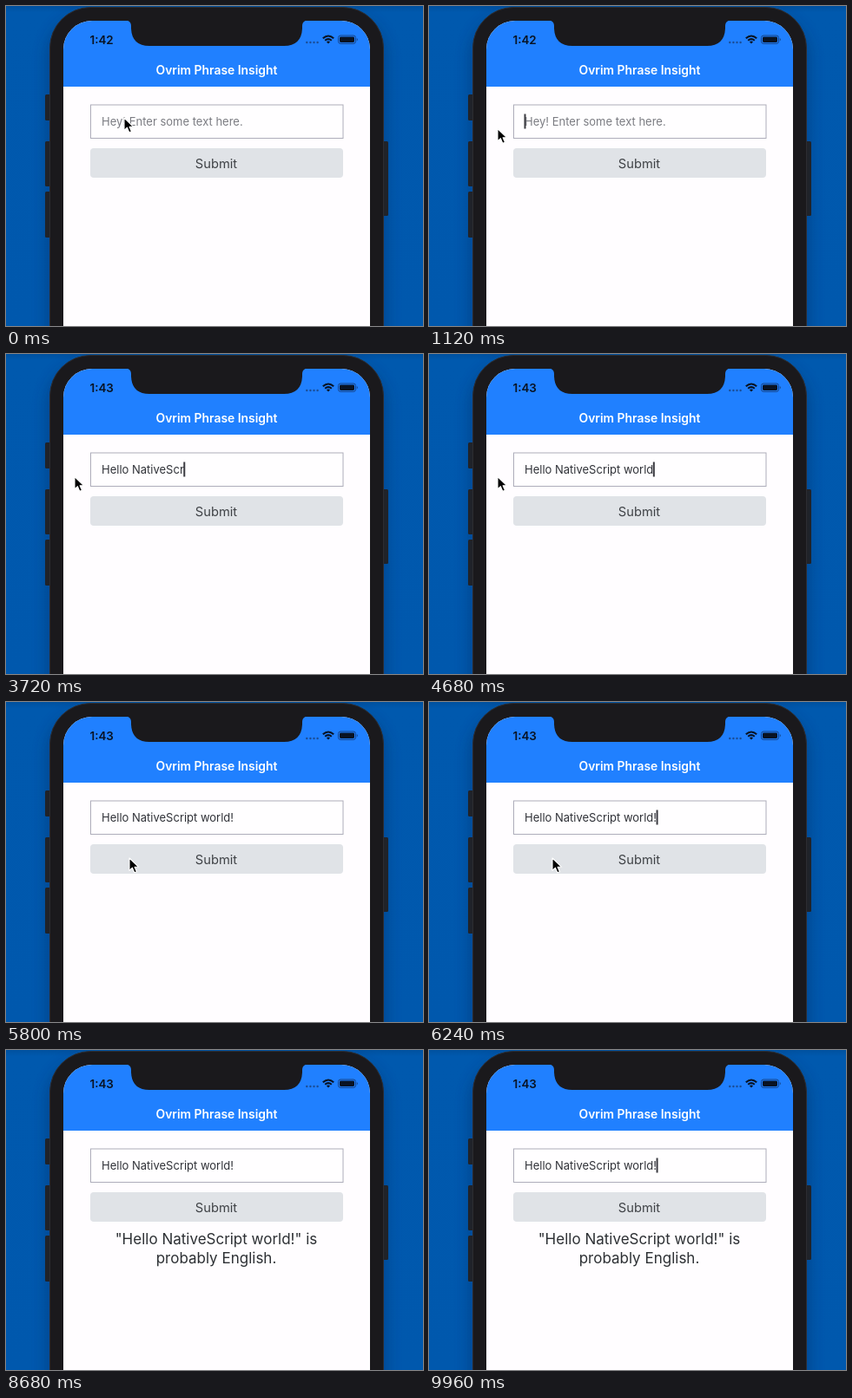
Write an HTML page that moves like this. It is 480 px wide and 369 px high and loops after 10 s.

```html
<!DOCTYPE html>
<html lang="en">
<head>
<meta charset="utf-8">
<title>Text analysis demo</title>
<style>
  html, body { margin: 0; width: 100%; height: 100%; overflow: hidden; background: #0059ae; }
  svg { display: block; width: 100vw; height: 100vh; }
  text { font-family: Inter, "Open Sans", sans-serif; white-space: pre; }
  .mid { text-anchor: middle; }
  .bold { font-weight: 600; }
</style>
</head>
<body>
<svg viewBox="0 0 480 369">
  <defs>
    <linearGradient id="wall" x2="0" y2="1">
      <stop offset="0" stop-color="#00519f"/>
      <stop offset=".02" stop-color="#0059ae"/>
      <stop offset="1" stop-color="#0058ad"/>
    </linearGradient>
    <filter id="soft" x="-20%" y="-20%" width="140%" height="140%">
      <feGaussianBlur stdDeviation="9"/>
    </filter>
    <clipPath id="screen"><rect x="66" y="17" width="353" height="420" rx="33"/></clipPath>
  </defs>

  <rect width="480" height="369" fill="url(#wall)"/>
  <rect x="48" y="12" width="389" height="430" rx="46" fill="#002c60" opacity=".45" filter="url(#soft)"/>

  <!-- phone -->
  <g fill="#202329">
    <rect x="45" y="102" width="7" height="30" rx="1.5"/>
    <rect x="45" y="156" width="7" height="52" rx="1.5"/>
    <rect x="45" y="214" width="7" height="53" rx="1.5"/>
    <rect x="433" y="156" width="7" height="86" rx="1.5"/>
  </g>
  <rect x="50.5" y="1.5" width="384" height="450" rx="47" fill="#1a191c" stroke="#2d2d32"/>
  <g clip-path="url(#screen)">
    <rect x="66" y="17" width="353" height="352" fill="#fffdff"/>
    <rect x="66" y="17" width="353" height="76" fill="#2080ff"/>
    <path d="M138 16.5Q144 17 144 23V26Q145 46 165 46H320Q340 46 341 26V23Q341 17 347 16.5Z" fill="#1a191c"/>
  </g>

  <!-- status bar -->
  <text id="clock" class="bold" x="96.5" y="43.5" font-size="13.4" fill="#091323"></text>
  <g fill="#1a4d96">
    <circle cx="346.3" cy="42" r="1.2"/><circle cx="350.4" cy="42" r="1.2"/>
    <circle cx="354.5" cy="42" r="1.2"/><circle cx="358.6" cy="42" r="1.2"/>
  </g>
  <g fill="none" stroke="#091323" stroke-width="2">
    <path d="M364.8 37.3Q371 31.6 377.2 37.3M367.2 39.8Q371 36.4 374.8 39.8"/>
    <path d="M371 43.4L368.9 41.3Q371 39.6 373.1 41.3Z" fill="#091323" stroke="none"/>
  </g>
  <rect x="382.5" y="34" width="20" height="9.4" rx="2.6" fill="none" stroke="#164489"/>
  <rect x="384" y="35.4" width="17" height="6.6" rx="1.4" fill="#091323"/>
  <path d="M403.8 37Q406 38.7 403.8 40.4Z" fill="#164489"/>

  <!-- app -->
  <text class="mid bold" x="242.5" y="79" font-size="13.9" fill="#fff">Ovrim Phrase Insight</text>
  <rect x="97.5" y="114" width="290.5" height="38.5" fill="#fffeff" stroke="#adadba"/>
  <text id="field" x="110" y="137.5" font-size="13"></text>
  <rect id="caret" y="124.5" width="2" height="17" fill="#3a3a40"/>
  <rect x="97" y="164" width="291" height="34" rx="4" fill="#e0e3e7"/>
  <text class="mid" x="242" y="186.7" font-size="14.7" fill="#3f4246">Submit</text>
  <g id="result" class="mid" font-size="17" fill="#2d3034">
    <text x="242" y="224.3">"Hello NativeScript world!" is</text>
    <text x="242" y="246.3">probably English.</text>
  </g>

  <path id="pointer" d="M0 0V14.3L3.4 11.2L5.8 16.8L8.5 15.7L6.1 10.3H10.7Z"
        fill="#000" stroke="#fff" stroke-width="1.1" stroke-linejoin="round"/>
</svg>
<script>
const LOOP = 10000;
const MESSAGE = "Hello NativeScript world!";
const TYPE_START = 2080, KEY_TIME = 110;
const TYPE_END = TYPE_START + KEY_TIME * MESSAGE.length;

const [clock, field, caret, result, pointer] =
  ["clock", "field", "caret", "result", "pointer"].map(id => document.getElementById(id));

// Pointer stops: [arrive from, arrive at, x, y]
const stops = [[0, 0, 136, 129], [320, 840, 79, 141.5], [5000, 5560, 142, 180]];

const show = (el, on) => el.setAttribute("visibility", on ? "visible" : "hidden");
const ease = p => p * p * (3 - 2 * p);

function pointerAt(t) {
  let [, , x, y] = stops[0];
  for (const [from, to, nx, ny] of stops.slice(1)) {
    const p = ease(Math.min(1, Math.max(0, (t - from) / (to - from))));
    x += (nx - x) * p;
    y += (ny - y) * p;
  }
  return [x, y];
}

function draw(t) {
  const count = Math.max(0, Math.min(MESSAGE.length, Math.floor((t - TYPE_START) / KEY_TIME) + 1));
  const typed = MESSAGE.slice(0, count);
  clock.textContent = t < 1800 ? "1:42" : "1:43";
  field.textContent = typed || "Hey! Enter some text here.";
  field.setAttribute("fill", typed ? "#303238" : "#7b7c82");

  const typing = t >= TYPE_START && t < TYPE_END + 400;
  const blinkOn = (t + 150) % 1000 < 550;
  show(caret, t > 240 && (typing || blinkOn));
  caret.setAttribute("x", typed ? 109.5 + field.getComputedTextLength() : 109.5);

  show(result, t >= 6500);
  show(pointer, t < 8600);
  pointer.setAttribute("transform", `translate(${pointerAt(t)})`);
}

const start = performance.now();
function tick() {
  draw((performance.now() - start) % LOOP);
  requestAnimationFrame(tick);
}
tick();
</script>
</body>
</html>
```
